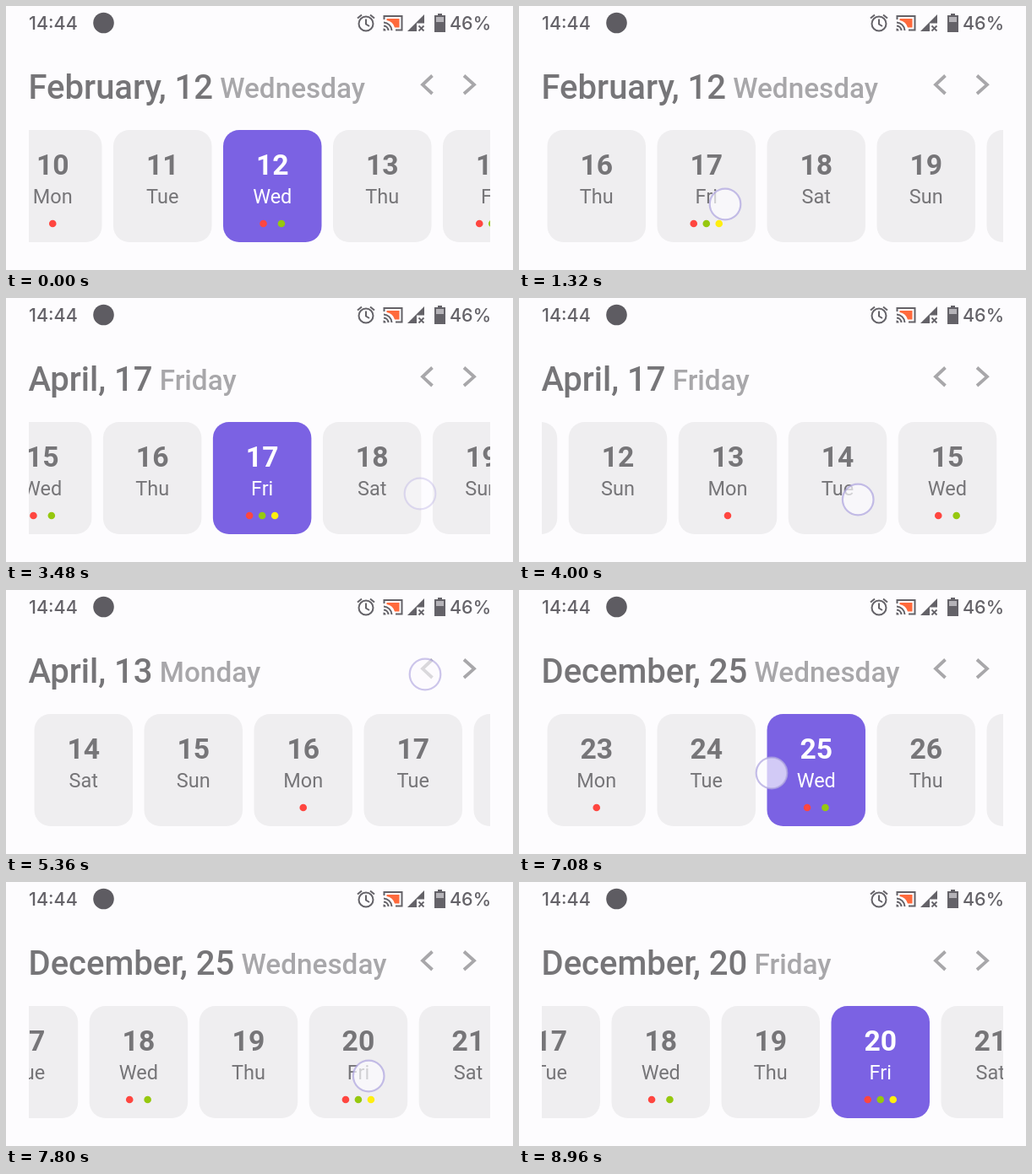
Write an HTML page with a canvas that moves like this. It is 600 px wide and 313 px high and loops after 9 s.

```html
<!DOCTYPE html>
<html lang="en">
<head>
<meta charset="utf-8">
<title>Day picker</title>
<style>
html, body { margin: 0; width: 100%; height: 100%; overflow: hidden; background: #fdfcfe; }
canvas { display: block; width: 600px; height: 313px; }
</style>
</head>
<body>
<canvas id="stage" width="600" height="313"></canvas>
<script>
const c = document.getElementById('stage').getContext('2d');
const LOOP = 9000, PITCH = 130, LEFT = 33.5, CARD_W = 116.5;
const BG = '#fdfcfe', GREY = '#767578', PALE = '#a8a7aa', ICON = '#646268';
const RED = '#ff4640', GREEN = '#96c80f', YELLOW = '#ffee10';
const WEEK = ['Sunday', 'Monday', 'Tuesday', 'Wednesday', 'Thursday', 'Friday', 'Saturday'];
const MONTHS = ['January', 'February', 'March', 'April', 'May', 'June', 'July',
  'August', 'September', 'October', 'November', 'December'];
// Dots by weekday: [colour, x offset from the card centre]
const DOTS = {
  1: [[RED, 0]],
  3: [[RED, -10.7], [GREEN, 10.7]],
  5: [[RED, -15], [GREEN, 0], [YELLOW, 15]]
};

// Days count from 12 February 2020. [time, day]
const firstDay = [[0, 0], [280, 30], [880, 64], [5340, 31], [5660, 5], [5980, -23], [6280, -51]];
const selected = [[0, 0], [1400, 65], [4300, 61], [6800, -49], [8480, -54]];
// [time, strip offset, 1 = fling that slows down]
const scroll = [
  [0, 223.5], [280, 223.5], [280, 0],
  [2660, 0], [2900, -260], [3160, -400, 1], [3220, -400], [3400, -80], [3720, 285, 1],
  [3740, 285], [4000, 545], [4100, 556, 1], [5340, 556], [5340, 0],
  [7110, 0], [7280, 221], [7500, 450, 1], [7540, 450], [7800, 715], [7920, 726, 1], [LOOP, 726]
];
// [down, up, x, y, 1 = drags the strip]
const touches = [
  [40, 280, 554, 101], [720, 880, 554, 101], [1160, 1400, 244, 235],
  [2600, 2900, 485, 221, 1], [3220, 3400, 170, 232, 1], [3740, 4100, 141, 239, 1],
  [4200, 4300, 262, 239],
  [5180, 5340, 496, 100], [5560, 5660, 496, 100], [5880, 5980, 496, 100], [6100, 6160, 496, 100],
  [6600, 6800, 345, 225], [7040, 7280, 299, 217, 1], [7540, 7920, 164, 230, 1],
  [8300, 8480, 436, 236]
];

const dateOf = day => new Date(Date.UTC(2020, 1, 12 + day));
const stepAt = (list, t) => list.filter(k => k[0] <= t).pop()[1];

function offsetAt(t) {
  const i = scroll.findIndex(k => k[0] > t);
  const [t0, a] = scroll[i - 1], [t1, b, fling] = scroll[i];
  const p = (t - t0) / (t1 - t0);
  return a + (b - a) * (fling ? 1 - (1 - p) ** 2 : p);
}

function text(s, x, y, font, color, align = 'left') {
  c.font = font;
  c.fillStyle = color;
  c.textAlign = align;
  c.fillText(s, x, y);
}

function disc(x, y, r, color) {
  c.fillStyle = color;
  c.beginPath();
  c.arc(x, y, r, 0, 7);
  c.fill();
}

function fill(d, color) {
  c.fillStyle = color;
  c.fill(new Path2D(d));
}

function line(d, color, width) {
  c.strokeStyle = color;
  c.lineWidth = width;
  c.stroke(new Path2D(d));
}

function statusBar() {
  const font = '500 21.5px Inter, sans-serif';
  text('14:44', 27, 28, font, ICON);
  text('46%', 574, 28, font, ICON, 'right');
  disc(115.5, 20, 12.3, '#5e5c62');
  // alarm clock
  line('M434.5 21a8.5 8.5 0 1 1-17 0a8.5 8.5 0 1 1 17 0M426 15.5V21.5L430 24M416 14.5L421 10.5M436 14.5L431 10.5', ICON, 2);
  // screen cast
  fill('M450.5 15H465.5V25.5H460A12 12 0 0 0 450.5 17Z', '#ff6a3c');
  line('M447.5 16V12H468.5V28.5H461M447 19.5A10 10 0 0 1 456.5 29M447 23.5A6 6 0 0 1 452.5 29', ICON, 2);
  fill('M446.5 26.5A3 3 0 0 1 449.5 29.5H446.5Z', ICON);
  // signal
  fill('M475 30L495 10V20.5H486V30Z', ICON);
  line('M488.5 23.5L494.5 29.5M494.5 23.5L488.5 29.5', ICON, 1.8);
  // battery
  fill('M511 9H516V11H520V31H507V11H511Z', ICON);
  fill('M509 13H518V19H509Z', '#b5b3b8');
}

function header(day) {
  const d = dateOf(day);
  const label = MONTHS[d.getUTCMonth()] + ', ' + d.getUTCDate();
  text(label, 26.5, 110, '500 40px Roboto, sans-serif', GREY);
  const x = 26.5 + c.measureText(label).width;
  text(' ' + WEEK[d.getUTCDay()], x, 109, '500 33.3px Roboto, sans-serif', PALE);
  line('M504.5 82.5L493 93.3L504.5 104', PALE, 3.8);
  line('M542 82.5L554 93.3L542 104', PALE, 3.8);
}

function card(x, day, active) {
  const d = dateOf(day), mid = x + CARD_W / 2, ink = active ? '#fff' : GREY;
  c.fillStyle = active ? '#7b62e3' : '#efeef0';
  c.beginPath();
  c.roundRect(x, 147, CARD_W, 133, 19);
  c.fill();
  text(d.getUTCDate(), mid, 199.5, '700 33.7px Roboto, sans-serif', ink, 'center');
  text(WEEK[d.getUTCDay()].slice(0, 3), mid, 234, '400 23.5px Roboto, sans-serif', ink, 'center');
  for (const [color, dx] of DOTS[d.getUTCDay()] || []) disc(mid + dx, 258, 4.3, color);
}

function strip(t, chosen) {
  const offset = offsetAt(t), first = stepAt(firstDay, t);
  const from = Math.floor(-offset / PITCH) - 1;
  c.save();
  c.beginPath();
  c.rect(27, 140, 546, 150);
  c.clip();
  for (let i = from; i < from + 7; i++)
    card(LEFT + offset + i * PITCH, first + i, first + i === chosen);
  c.restore();
}

function touch(t) {
  for (const [down, up, x, y, drag] of touches) {
    if (t < down || t > up + 160) continue;
    const dx = drag ? offsetAt(Math.min(t, up)) - offsetAt(down) : 0;
    c.globalAlpha = t < up ? 1 : 1 - (t - up) / 160;
    disc(x + dx, y, 18.3, 'rgba(253,252,255,.68)');
    c.strokeStyle = 'rgba(178,168,224,.75)';
    c.lineWidth = 2.2;
    c.stroke();
    c.globalAlpha = 1;
  }
}

const start = performance.now();
function draw() {
  const t = (performance.now() - start) % LOOP;
  const chosen = stepAt(selected, t);
  c.fillStyle = BG;
  c.fillRect(0, 0, 600, 313);
  statusBar();
  header(chosen);
  strip(t, chosen);
  touch(t);
  requestAnimationFrame(draw);
}
draw();
</script>
</body>
</html>
```
